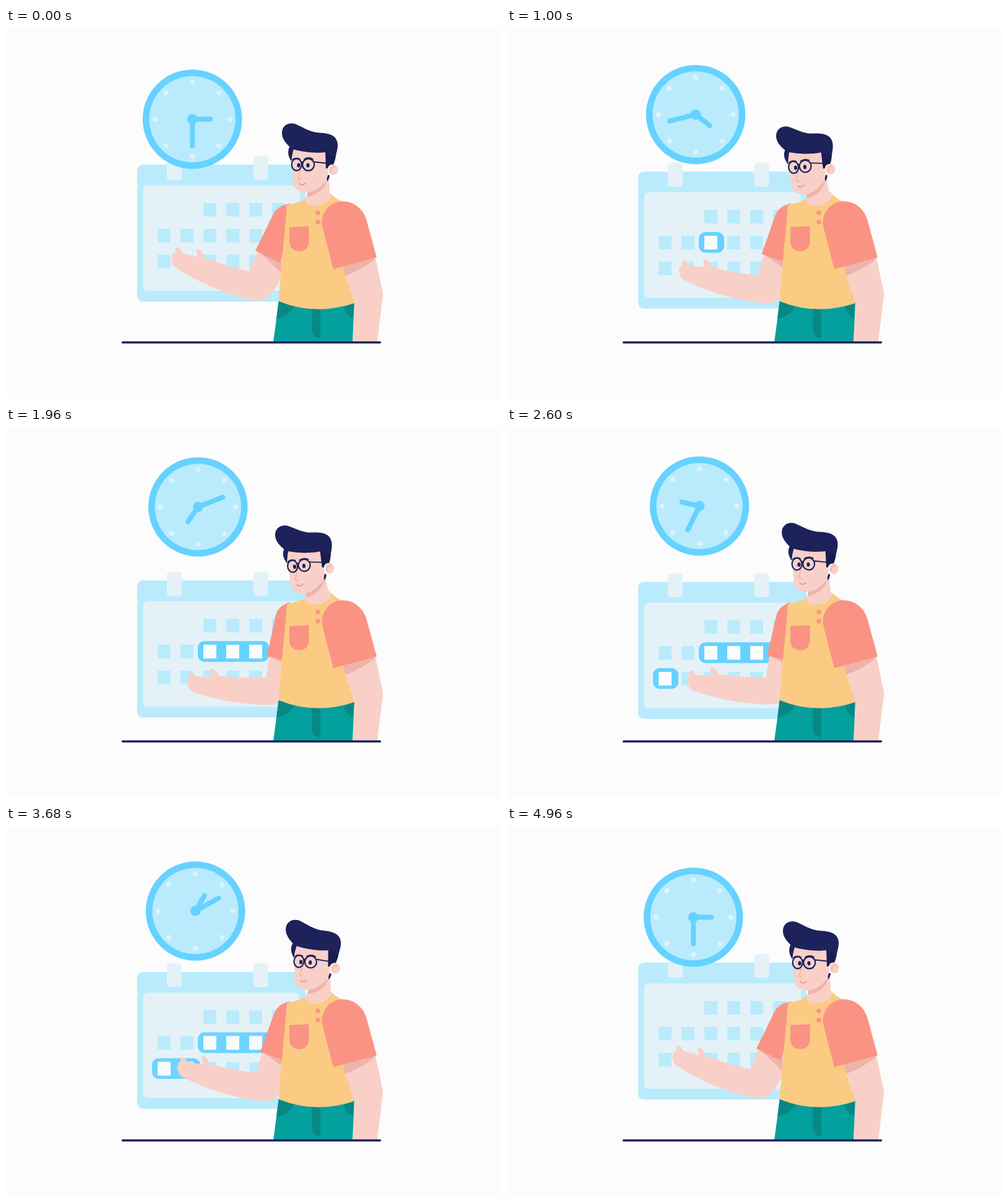
These frames come from a looping animation (800 by 600 pixels, 5 s). An HTML page with a canvas:

```html
<!DOCTYPE html>
<html lang="en">
<head>
<meta charset="utf-8">
<title>Planning</title>
<style>
  html, body { margin: 0; width: 100%; height: 100%; overflow: hidden; background: #fcfcfc; }
  canvas { display: block; width: 800px; height: 600px; }
</style>
</head>
<body>
<canvas id="stage" width="800" height="600"></canvas>
<script>
const ctx = document.getElementById('stage').getContext('2d');
const LOOP = 5000, STEP = 40, REST = 4960;
const NAVY = '#1d225b', SKIN = '#f9d0c8', SHADE = '#edb4ab', CORAL = '#fa9384',
      YELLOW = '#fbcb83', TEAL = '#03a09d', DEEP_TEAL = '#078885',
      SKY = '#b9ebfd', BLUE = '#66d2ff', PALE = '#e4f2f8';

const clamp = v => Math.min(1, Math.max(0, v));
const ramp = (t, a, b) => clamp((t - a) / (b - a));
const ease = (t, a, b) => { const u = ramp(t, a, b); return u * u * (3 - 2 * u); };
const upDown = (t, peak) => t < peak ? ease(t, 0, peak) : 1 - ease(t, peak, REST);

function fill(d, color) {
  ctx.fillStyle = color;
  ctx.fill(new Path2D(d));
}
function stroke(d, color, width) {
  ctx.strokeStyle = color;
  ctx.lineWidth = width;
  ctx.stroke(new Path2D(d));
}
function disc(x, y, rx, color, ry = rx) {
  ctx.fillStyle = color;
  ctx.beginPath();
  ctx.ellipse(x, y, rx, ry, 0, 0, Math.PI * 2);
  ctx.fill();
}
function box(x, y, w, h, r, color) {
  ctx.fillStyle = color;
  ctx.beginPath();
  ctx.roundRect(x, y, w, h, r);
  ctx.fill();
}
function moved(dx, dy, draw) {
  ctx.save();
  ctx.translate(dx, dy);
  draw();
  ctx.restore();
}
function turned(x, y, degrees, draw) {
  ctx.save();
  ctx.translate(x, y);
  ctx.rotate(degrees * Math.PI / 180);
  ctx.translate(-x, -y);
  draw();
  ctx.restore();
}

// Calendar
const CELL_W = 21, CELL_H = 22;
const cellX = col => 245 + 37 * col;
const cellY = row => 283 + 41.8 * row;

function drawPill(row, col, count, alpha) {
  if (alpha <= 0) return;
  const cells = new Path2D();
  for (let i = 0; i < count; i++) cells.rect(cellX(col + i), cellY(row), CELL_W, CELL_H);
  const pill = new Path2D();
  pill.roundRect(cellX(col) - 9, cellY(row) - 6, 41 + 37 * (count - 1), 33.5, 11);
  pill.addPath(cells);
  ctx.globalAlpha = alpha;
  ctx.fillStyle = BLUE;
  ctx.fill(pill, 'evenodd');
  ctx.fillStyle = '#fcfcfc';
  ctx.fill(cells);
  ctx.globalAlpha = 1;
}

function drawMarks(t) {
  const fade = 1 - ramp(t, 3640, 4220);
  const shown = k => ramp(t, 780 + 400 * k, 980 + 400 * k);
  const marks = [[1, 2, 1], [1, 2, 2], [1, 2, 3], [1, 2, 4], [2, 0, 1], [2, 0, 2]];
  marks.forEach(([row, col, count], k) => {
    const next = marks[k + 1];
    const covered = next && next[0] === row && shown(k + 1) === 1;
    if (!covered) drawPill(row, col, count, shown(k) * fade);
  });
}

function drawCalendar(t) {
  box(212, 221, 272, 221.5, 9, SKY);
  box(221.5, 254.5, 253.5, 170.5, 8, PALE);
  for (const x of [260, 399.5]) box(x, 207, 24, 38.5, 5, PALE);
  for (let row = 0; row < 3; row++)
    for (let col = row ? 0 : 2; col < 6; col++)
      box(cellX(col), cellY(row), CELL_W, CELL_H, 0, SKY);
  drawMarks(t);
}

// Clock, centred on the origin
function drawClock(t) {
  const turn = ease(t, 0, REST);
  disc(0, 0, 80.3, BLUE);
  disc(0, 0, 69.7, SKY);
  for (let i = 0; i < 8; i++) {
    const a = i * Math.PI / 4;
    disc(60.5 * Math.cos(a), 60.5 * Math.sin(a), 4.1, '#dcf3fc');
  }
  const hand = (length, degrees) =>
    turned(0, 0, degrees, () => stroke(`M0 0V${-length}`, BLUE, 8));
  hand(43, 180 + 720 * turn);
  hand(29, 90 + 360 * turn);
  disc(0, 0, 8.3, BLUE);
}

// Person
function drawPointingArm() {
  fill('M407 360L393 393C366 388 342 379 320 371.5C319 364 314 357 310 357.5C306 359 309 365 309 370' +
       'C300 369 291 366 284 363C282 358 279 354 276 355C273 357 273 361 275 365' +
       'C271 362 267 364 269 369C266 370 266 375 269 377C267 381 270 385 275 388' +
       'C310 412 370 437 408 440.5C424 440 436 424 446 400L452 330Z', SKIN);
  fill('M406 360L446 378V397C436 387 424 376 406 360Z', SHADE);
  fill('M459 284C445 286 436 291 430 305L403 360L443 379.5L464 300Z', CORAL);
}

function drawRestingArm() {
  fill('M540 385L597 371L609.5 430L600 508H560L563 445Z', SKIN);
  fill('M542 386L597 371L594 376C582 385 566 394 548 401Z', SHADE);
}

function drawTrousers() {
  fill('M441 441Q500 466 563 443L560 508H432Z', TEAL);
  fill('M440.5 442L466 450C460 461 450 468 437 470Z', DEEP_TEAL);
  fill('M562 445L546 451C548 461 553 467 561 469Z', DEEP_TEAL);
  fill('M494.5 454H508V502C499 501 494.5 496 494.5 488Z', DEEP_TEAL);
}

function drawShirt() {
  fill('M454 286.5C465 284 476 281 484 276L525 268C530 273 535 277 542 280L546 394L563 445' +
       'Q500 466 441 442C443 400 450 340 454 286.5Z', YELLOW);
  fill('M458 322L489.5 320.5V346C489 356 482 361 474 361C465 361 458 355 458 346Z', CORAL);
  disc(504, 299, 3.7, CORAL);
  disc(504, 314, 3.7, CORAL);
  fill('M529 390L599 371L583 312C577 291 560 279 541 280.5C522 282 509 300 510.5 318Z', CORAL);
  fill('M484 275C484 283 487 287 496 287.5C512 287 522 281 526 271L522 264L488 266Z', SKIN);
}

function drawHead() {
  fill('M487 255L521 236L523.5 268C520 279 508 284 496 284C488 284 486.5 278 487 270Z', SKIN);
  fill('M487 265C500 262 511 255 519 246C516 260 503 270 487 273Z', SHADE);
  fill('M518 238H523C523 242 521 246 519 248Z', NAVY);
  fill('M464 194L462.5 215L464 251C466 262 476 266.5 487 266C504 264 516 251 520 239V198Z', SKIN);
  fill('M459 191C454 199 456 208 461.5 216C462 208 463 202 465 196Z', NAVY);
  fill('M516 198L534 200C533 208 532 215 529 221C524 220 521 223 520 227H517Z', '#181c4e');
  disc(529, 229.5, 7.6, SKIN, 8.5);
  stroke('M525 233C524 227 528 224 532 225', '#f0aaa0', 1.2);
  fill('M459 193C452 186 445 178 446 168C447 157 457 152 467 155C479 160 489 167 502 169' +
       'C518 170 534 171 536 187C536.5 195 534 203 532 208L516 201C499 203 477 200 464 196Z', NAVY);

  disc(473, 222, 2.6, NAVY, 3.5);
  disc(488, 222, 2.6, NAVY, 3.5);
  ctx.strokeStyle = NAVY;
  ctx.lineWidth = 2.2;
  for (const [x, rx] of [[469.7, 8], [488.7, 9.5]]) {
    ctx.beginPath();
    ctx.ellipse(x, 221, rx, 9.7, 0, 0, Math.PI * 2);
    ctx.stroke();
  }
  stroke('M477 218Q478.5 216 480 218M498 216.5L521 219', NAVY, 1.8);
  stroke('M463 213Q468 209 475 212M482 212Q489 208 496 212', NAVY, 1.8);
  stroke('M475.5 230C475 236 472 240 472 242.5Q473 245 477 244', '#f0aaa0', 1.3);
  stroke('M474 251.5Q478.5 256.5 484 251', '#d08a88', 1.3);
}

function headAngle(t) {
  return -4.9 * ease(t, 0, 1000) + 8 * ease(t, 1980, 3200) - 3.1 * ease(t, 3300, REST);
}

function draw(t) {
  ctx.fillStyle = '#fcfcfc';
  ctx.fillRect(0, 0, 800, 600);
  ctx.lineCap = ctx.lineJoin = 'round';
  const drift = upDown(t, 2400);
  moved(0, 30 * drift, () => drawCalendar(t));
  moved(301.2 + 10 * drift, 147.5 - 20 * drift, () => drawClock(t));
  turned(455, 290, -14.4 * upDown(t, 2100), drawPointingArm);
  drawRestingArm();
  drawTrousers();
  drawShirt();
  turned(516, 300, headAngle(t), drawHead);
  stroke('M188.5 508.5H604.5', NAVY, 3.4);
}

function tick() {
  const t = performance.now() % LOOP;
  draw(Math.floor(t / STEP) * STEP);
  requestAnimationFrame(tick);
}
tick();
</script>
</body>
</html>
```
